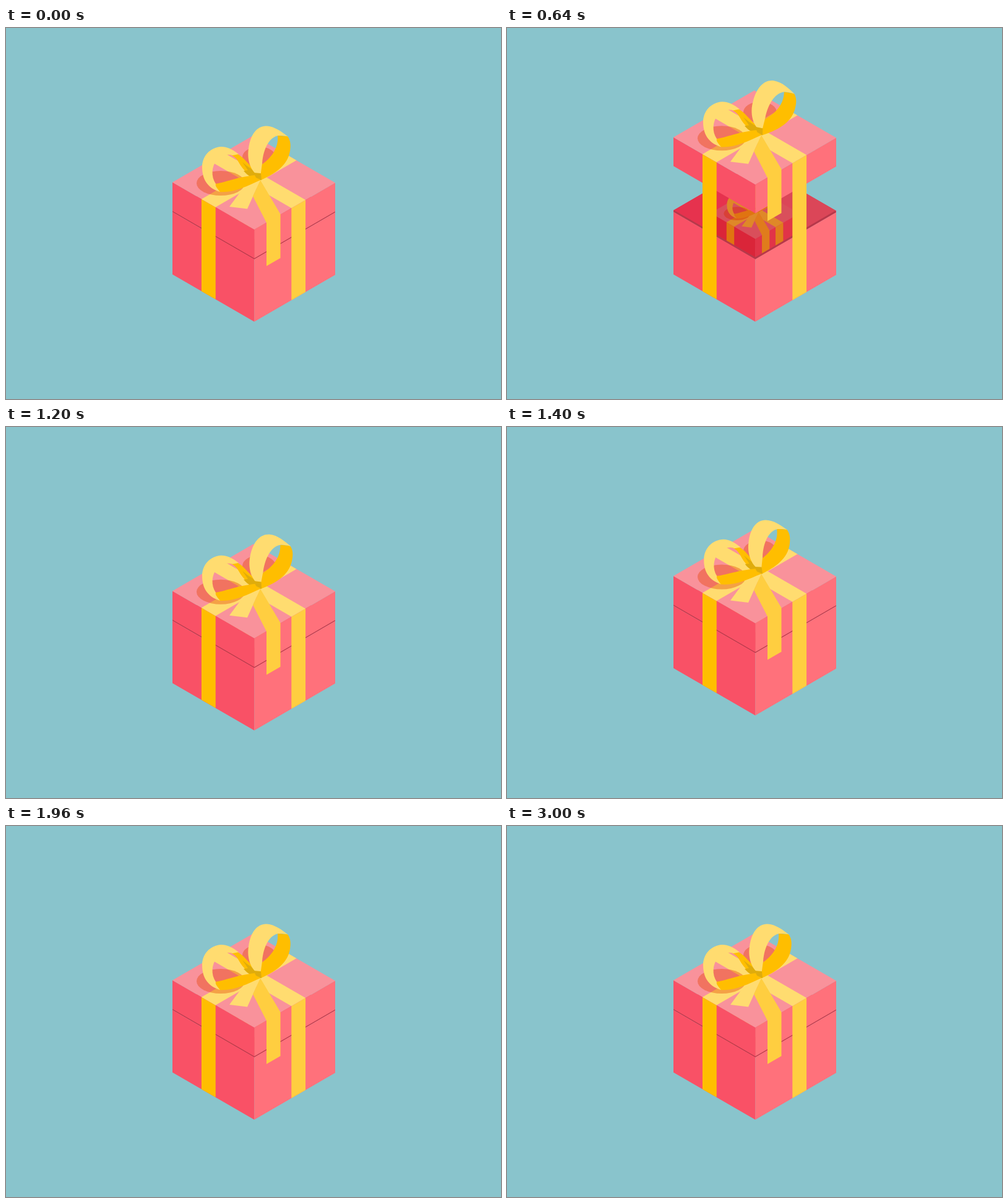
Animation of 800 by 600 pixels, one loop 3.04 s. Source, as an HTML page with a canvas:

```html
<!DOCTYPE html>
<html lang="en">
<head>
<meta charset="utf-8">
<title>Gift box</title>
<style>
html, body { margin: 0; width: 100%; height: 100%; overflow: hidden; background: #89c4cc; }
canvas { display: block; }
</style>
</head>
<body>
<canvas id="stage" width="800" height="600"></canvas>
<script>
const ctx = document.getElementById('stage').getContext('2d');
const LOOP = 3040, STEP = 40;
const PEAK = 680, HIT = 1060, REST = 1800, HALF = 200;
const LIFT = 73.5, BOUNCE = 26.5, SWING = 6.5;
const LID = 46.5, RIM = 48, FLOOR = 149;
const LEFT_BAND = [.473, .645], RIGHT_BAND = [.459, .633];
const KNOT = [411, 246];

const bright = {
  left: '#f95166', right: '#ff717b', top: '#f9929b',
  deep: '#ffbe00', mid: '#ffce40', pale: '#ffdc70', fold: '#dfac0c',
  shade: 'rgba(225,65,0,.38)'
};
const dim = {
  left: '#da2539', right: '#e13448', top: '#d94f5b',
  deep: '#e07411', mid: '#e07c1c', pale: '#df8828', fold: '#cf6410',
  shade: 'rgba(214,40,0,.4)'
};

// Isometric point: a runs along the left edge, b along the right, z downwards
const iso = (a, b, z = 0) => [401.3 - 132.3 * a + 130.7 * b, 326 - 76.5 * a - 75.8 * b + z];

function trace(pts) {
  ctx.beginPath();
  for (const p of pts) ctx.lineTo(...p);
}

function poly(color, ...pts) {
  trace(pts);
  ctx.fillStyle = color;
  ctx.fill();
}

function shape(color, d) {
  ctx.fillStyle = color;
  ctx.fill(new Path2D(d));
}

function oval(color, x, y, rx, ry) {
  ctx.beginPath();
  ctx.ellipse(x, y, rx, ry, 0, 0, Math.PI * 2);
  ctx.fillStyle = color;
  ctx.fill();
}

// Draw moved, turned and scaled around a pivot
function place([x, y], [dx, dy], deg, scale, draw) {
  ctx.save();
  ctx.translate(x + dx, y + dy);
  ctx.rotate(deg * Math.PI / 180);
  ctx.scale(scale, scale);
  ctx.translate(-x, -y);
  draw();
  ctx.restore();
}

const leftFace = (color, [u, v], top, bottom) =>
  poly(color, iso(u, 0, top), iso(v, 0, top), iso(v, 0, bottom), iso(u, 0, bottom));
const rightFace = (color, [u, v], top, bottom) =>
  poly(color, iso(0, u, top), iso(0, v, top), iso(0, v, bottom), iso(0, u, bottom));
const lidPatch = (color, [a, c], [b, d]) =>
  poly(color, iso(a, b), iso(c, b), iso(c, d), iso(a, d));

function sides(c, top, bottom) {
  leftFace(c.left, [0, 1], top, bottom);
  rightFace(c.right, [0, 1], top, bottom);
}

function strips(c, top, bottom) {
  leftFace(c.deep, LEFT_BAND, top, bottom);
  rightFace(c.mid, RIGHT_BAND, top, bottom);
}

function tails(c) {
  poly(c.pale, KNOT, [384, 258], [361, 289], [390, 292.5]);
  poly(c.mid, KNOT, [399, 272], [421, 315], [421, 385], [443.5, 372], [443.5, 301]);
}

function leftLoop(c) {
  shape(c.deep, 'M355 204 L372 203 C385 208 391 222 411 236 L412 246 C394 241 383 230 376 217 C371 208 364 204 355 204Z');
  shape(c.fold, 'M382 217 C391 225 400 230 411 236 L412 246 C400 243 391 240 384 231 L391 230Z');
  shape(c.deep, 'M337 252 C352 251 374 240 411 237 L411 246 C388 256 369 267 344 265Z');
  shape(c.pale, 'M376 204 C366 196 357 192 348 192 C329 193 317 208 317 225 C317 248 329 260 346 265 C340 258 338 255 339 252 C331 240 332 224 341 213 C348 206 356 203 366 206Z');
}

function rightLoop(c) {
  shape(c.deep, 'M439 174 L455 175 C461 183 460 192 459 199 C455 223 434 236 412 246 L411 223 C429 210 441 194 439 174Z');
  shape(c.pale, 'M411 241 C396 234 389 214 392 195 C395 172 406 158 421 158.5 C434 159 446 168 456 176 C452 174 445 174 440 174 C427 176 416 193 414 219Z');
  poly(c.fold, [400, 234], [412, 235], [413, 246], [404, 242]);
}

function lidTop(c, swing) {
  const fold = Math.max(0, -swing) * .9;
  lidPatch(c.top, [0, 1], [0, 1]);
  lidPatch(c.pale, LEFT_BAND, [0, 1]);
  lidPatch(c.pale, [0, 1], RIGHT_BAND);
  oval(c.shade, 347, 251, 39, 20);
  oval(c.shade, 409, 209, 27, 17);
  tails(c);
  place(KNOT, [0, 0], fold, 1 - fold * .003, () => leftLoop(c));
  place(KNOT, [0, 0], swing, 1 + swing * .004, () => rightLoop(c));
}

function smallGift() {
  sides(dim, 0, FLOOR);
  strips(dim, 0, FLOOR);
  lidTop(dim, 0);
}

function inside() {
  const back = RIM - 3;
  const front = [iso(1, 0, RIM), iso(0, 0, RIM), iso(0, 1, RIM)];
  ctx.save();
  trace([iso(1, 0, back), iso(1, 1, back), iso(0, 1, back), ...front.reverse()]);
  ctx.clip();
  poly('#e6324e', iso(1, 0, back), iso(1, 1, back), iso(0, 0, RIM), iso(1, 0, RIM));
  poly('#db4658', iso(1, 1, back), iso(0, 1, back), iso(0, 1, RIM), iso(0, 0, RIM));
  place(iso(0, 0), [0, 15], 0, .545, smallGift);
  trace(front);
  ctx.strokeStyle = '#b8384a';
  ctx.lineWidth = 6;
  ctx.stroke();
  ctx.restore();
}

// Lift with ease out, drop with ease in, then a fading bounce
function motion(t) {
  if (t < PEAK) {
    const u = t / PEAK;
    return { y: -LIFT * (1 - (1 - u) ** 1.6), swing: SWING * Math.sin(u * Math.PI / 2) };
  }
  if (t < HIT) {
    const u = (t - PEAK) / (HIT - PEAK);
    return { y: -LIFT * (1 - u ** 2.3), swing: SWING * Math.cos(u * Math.PI) };
  }
  const fade = Math.max(0, (REST - t) / (REST - HIT));
  const phase = (t - HIT) / HALF * Math.PI;
  return { y: BOUNCE * fade ** 1.5 * Math.sin(phase), swing: -SWING * fade * Math.cos(phase) };
}

function render(t) {
  const { y, swing } = motion(t);
  const boxY = t < HIT ? 0 : y;
  ctx.fillStyle = '#89c4cc';
  ctx.fillRect(0, 0, 800, 600);
  place(KNOT, [0, boxY], 0, 1, () => {
    inside();
    sides(bright, RIM, FLOOR);
  });
  sides(bright, y, y + LID);
  strips(bright, y, boxY + FLOOR);
  place(KNOT, [0, y], 0, 1, () => lidTop(bright, swing));
}

const start = performance.now();
function tick() {
  const t = (performance.now() - start) % LOOP;
  render(Math.floor(t / STEP) * STEP);
  requestAnimationFrame(tick);
}
tick();
</script>
</body>
</html>
```
